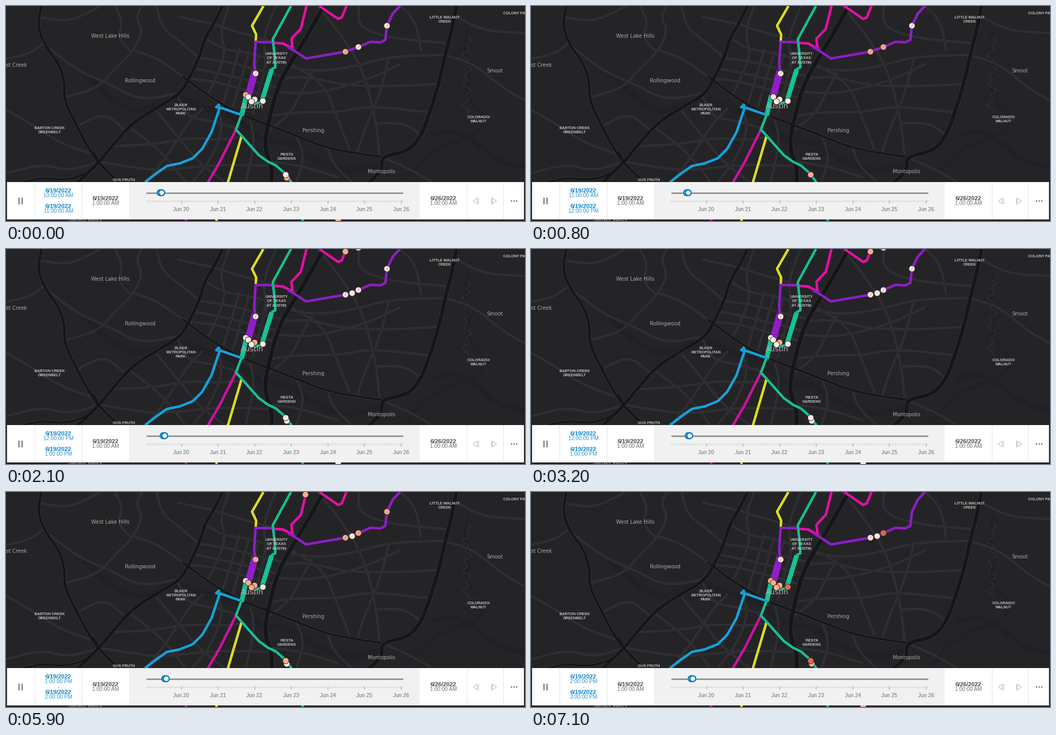
Write a matplotlib script that moves like this. It is 1000 px wide and 414 px high and loops after 7.2 s.

```python
import matplotlib.pyplot as plt
import numpy as np
from matplotlib.animation import FuncAnimation
from matplotlib.patches import Circle, Polygon, Rectangle

W, H = 1000, 414
DPI = 64  # a power of two keeps the pixel size exact
PX = 72 / DPI
FRAMES, INTERVAL = 72, 100

BACK = "#242427"
YELLOW, PURPLE, TEAL = "#eef01c", "#9b1fd6", "#17cf9f"
PINK, MAGENTA, BLUE = "#fb0fb4", "#e310b0", "#14b0ec"
ACCENT = "#007ac2"
DOT_COLORS = {"c": "#fbeae0", "p": "#f8ad8a", "r": "#e3694f"}

fig = plt.figure(figsize=(W / DPI, H / DPI), dpi=DPI, facecolor=BACK)
ax = fig.add_axes([0, 0, 1, 1])
ax.set(xlim=(0, W), ylim=(H, 0))
ax.axis("off")


def pairs(coords):
    return np.array(coords, float).reshape(-1, 2)


def smooth(pts, rounds=3):
    """Cut corners while keeping both ends."""
    for _ in range(rounds):
        a, b = pts[:-1], pts[1:]
        cut = np.stack([0.75 * a + 0.25 * b, 0.25 * a + 0.75 * b], 1)
        pts = np.vstack([pts[:1], cut.reshape(-1, 2), pts[-1:]])
    return pts


def stroke(pts, color, width, z, **kw):
    return ax.plot(*np.asarray(pts).T, color=color, lw=width * PX, zorder=z,
                   solid_capstyle="butt", solid_joinstyle="round", **kw)[0]


def street(*coords):
    pts = smooth(pairs(coords))
    stroke(pts, "#404044", 3.2, 2)
    stroke(pts, "#252528", 1.5, 2.1)


def highway(*coords, width=6):
    pts = smooth(pairs(coords))
    stroke(pts, "#35363a", width + 1.6, 3)
    stroke(pts, "#141618", width, 3.1)


def water(*coords, width=8):
    stroke(smooth(pairs(coords)), "#1f2124", width, 1)


def route(color, *coords, lanes=1):
    pts = pairs(coords)
    side = (np.arange(lanes) - (lanes - 1) / 2) * 4.2
    for dx in side:
        lane = pts + [dx, dx * 0.25]
        stroke(lane, color, 4.6, 5)
        stroke(lane, "#00000055", 1.5, 5.1, dashes=(1.1, 1.6))


def label(x, y, text, size, color, bold=False, font="Liberation Sans",
          ha="center", z=8):
    """Place text with its capitals centred on y."""
    return ax.text(x, y + 0.36 * size, text, fontsize=size * PX, color=color,
                   family=font, weight="bold" if bold else "normal",
                   ha=ha, va="baseline", zorder=z)


def place(x, y, text, size=9.7, color="#a9a9ab"):
    label(x, y, text, size, color, font="DejaVu Sans")


def district(x, y, *lines):
    for i, line in enumerate(lines):
        label(x, y + 8.3 * i, line, 7.2, "#c4c4c6", bold=True)


# Water
water(150, 130, 215, 190, 262, 205, 330, 172, 375, 195, 440, 212, 470, 240,
      500, 262, 540, 258, 600, 300, 660, 320, 720, 305, width=12)
water(890, 45, 884, 90, 894, 130, 886, 160, 898, 190, 930, 215, 905, 250,
      850, 265, 810, 290, 770, 335, width=5)
water(820, 250, 860, 238, 905, 262, 950, 300, 1000, 310, width=10)
jag = np.linspace(0, 1, 70)
creek = np.c_[888 + 5 * np.sin(47 * jag) + 4 * np.sin(19 * jag), 60 + 145 * jag]
stroke(creek, "#38393c", 1, 1.5)

# West
street(0, 102, 45, 92, 72, 72)
street(64, 22, 120, 30, 160, 12, 182, 0)
street(262, 0, 250, 22, 264, 48, 243, 90, 210, 120, 178, 158, 112, 176)
street(75, 75, 140, 126, 200, 150, 258, 182, 332, 168)
street(245, 85, 290, 100, 330, 128, 350, 142)
street(140, 230, 190, 205, 230, 240)
street(0, 322, 70, 304, 120, 318, 180, 300)
street(0, 200, 40, 222, 100, 262, 165, 285)
street(210, 0, 225, 30, 215, 62, 243, 90)
street(290, 0, 300, 42, 340, 72, 372, 100)

# Centre north of the river
street(400, 35, 436, 47, 476, 58, 560, 82)
street(383, 62, 420, 84, 470, 90, 540, 112)
street(372, 100, 430, 108, 480, 122, 545, 138)
street(352, 140, 400, 145, 440, 156, 520, 178)
street(362, 120, 420, 132, 475, 145, 525, 158)
street(430, 0, 412, 50, 424, 90, 404, 140, 388, 172)
street(330, 20, 365, 28, 400, 35)
for step in range(4):
    x = 418 + 19 * step
    street(x + 32, 82 + 5 * step, x + 18, 130 + 4 * step, x, 188 + 7 * step)
street(520, 0, 495, 60, 502, 110, 488, 160)

# East
street(600, 0, 640, 48, 680, 108, 700, 165, 714, 230, 720, 290)
street(548, 118, 600, 126, 665, 118, 740, 97, 846, 94)
street(545, 110, 612, 148, 638, 215, 662, 276)
street(530, 140, 580, 135, 650, 153, 740, 155, 834, 150)
street(520, 165, 590, 170, 690, 145, 760, 112)
street(508, 212, 560, 204, 640, 205, 700, 192, 818, 205)
street(505, 240, 548, 208, 568, 168, 590, 128)
street(738, 98, 722, 165, 690, 240, 676, 284)
street(680, 0, 678, 40, 740, 62, 855, 72)
street(760, 0, 790, 30, 800, 88)
street(846, 95, 900, 110, 960, 160, 1000, 182)
street(868, 20, 920, 48, 1000, 52)
street(800, 250, 770, 225, 712, 226)
street(725, 292, 770, 310, 820, 338)
street(560, 250, 575, 290, 560, 338)
street(620, 274, 630, 305, 665, 338)
street(512, 300, 570, 308, 640, 330)

# South
street(456, 252, 420, 258, 350, 254, 288, 266, 205, 270)
street(380, 196, 350, 225, 318, 278, 272, 338)
street(290, 202, 335, 256, 370, 300, 420, 338)
street(240, 235, 300, 280, 345, 338)
street(330, 172, 350, 215, 400, 222, 446, 236)
street(410, 200, 418, 240, 392, 300, 360, 338)
street(470, 220, 480, 260, 462, 338)
street(180, 300, 240, 310, 300, 318, 400, 305, 510, 308)

highway(68, 0, 61, 40, 76, 78, 100, 108, 113, 145, 112, 182, 137, 232,
        160, 276, 184, 308, 218, 340, width=5)
highway(417, 0, 400, 35, 383, 62, 372, 100, 351, 143, 335, 170, 290, 196,
        245, 224, 208, 265, 180, 300, 138, 340)
highway(0, 352, 60, 330, 115, 336, 158, 322, 180, 300, 168, 280, width=4)
highway(340, 135, 400, 180, 455, 210, 500, 227, 560, 250, 620, 274,
        690, 286, 722, 290, width=4)
highway(612, 0, 590, 40, 568, 78, 548, 110, 531, 140, 518, 175, 508, 215,
        500, 250, 500, 280, 512, 308, 512, 345, width=8)
highway(868, 0, 858, 50, 846, 95, 834, 150, 815, 210, 800, 250, 775, 280,
        722, 290, 726, 315, 694, 345, width=7)

# Transit routes
route(YELLOW, 496, 0, 474, 38, 482, 55, 481, 70)
route(YELLOW, 454, 250, 428, 338, 405, 414)
route(MAGENTA, 443, 238, 412, 300, 390, 338, 346, 414)
route(PINK, 515, 71, 534, 72, 552, 82, 550, 63, 568, 44, 579, 0)
route(PINK, 604, 0, 640, 25, 647, 22, 656, 0)
route(PURPLE, 481, 130, 478, 113, 481, 69, 515, 70)
route(PURPLE, 543, 79, 554, 85, 578, 101, 654, 88, 679, 79, 702, 69, 722, 70,
      731, 65, 734, 38, 745, 15, 759, 0)
route(TEAL, 549, 0, 514, 64, 517, 90, 519, 118, 511, 122)
route(TEAL, 512, 122, 493, 183, lanes=2)
route(TEAL, 495, 184, 483, 187, 476, 181)
route(PURPLE, 480, 125, 467, 172, lanes=3)
route(TEAL, 463, 172, 454, 211, lanes=2)
route(TEAL, 454, 209, 443, 238, 455, 251, 470, 268, 487, 287, 505, 300,
      520, 307, 535, 320, 549, 338, 572, 414)
route(BLUE, 452, 209, 411, 195, 405, 195, 410, 190, 411, 198, 396, 243,
      378, 275, 360, 293, 335, 303, 310, 308, 290, 322, 268, 339)

# Map labels
place(201, 58, "West Lake Hills")
place(20, 114, "st Creek")
place(258, 144, "Rollingwood")
place(942, 125, "Smoot")
place(592, 239.5, "Pershing")
place(724, 318.5, "Montopolis")
place(474, 192, "Austin", 14, "#b4b4b6")
place(153, 411, "Sunset Valley")
district(845, 21.5, "LITTLE WALNUT", "CREEK")
district(984, 13.5, "COLONY PARK")
district(521, 91.5, "UNIVERSITY", "OF TEXAS", "AT AUSTIN")
district(337, 190, "ZILKER", "METROPOLITAN", "PARK")
district(84, 234, "BARTON CREEK", "GREENBELT")
district(910.5, 213, "COLORADO/", "WALNUT")
district(541, 285, "FIESTA", "GARDENS")
district(227, 334, "GUS FRUTH")

# Bus positions: one letter per stop gives its colour for the hour
STOPS = [(577, 5), (654, 5), (679, -2), (734, 38), (654, 88), (667, 85),
         (679, 79), (481, 130), (462, 171), (467, 175), (479, 180),
         (473, 184), (495, 183), (541, 331), (539, 325), (640, 412)]
HOURS = [
    (0, 10, "---cp-ccpccccpcp"),
    (1, 11, "---cp-pc-cccc-p-"),
    (20, 12, "-ppcccccccpccccc"),
    (40, 13, "p--ppcppcpppccp-"),
    (60, 14, "----ccrcpppprprp"),
]
SLASHED = {3, 4, 6, 7}
dots = []
for i, (x, y) in enumerate(STOPS):
    dot = ax.add_patch(Circle((x, y), 5.9, ec="#2b2022", lw=0.9 * PX, zorder=9))
    parts = [dot]
    if i in SLASHED:
        parts.append(stroke([(x - 1.5, y + 3.5), (x + 2, y - 3.5)],
                            "#6b5a5a", 0.9, 9.1, alpha=0.6))
    dots.append(parts)

# Time slider panel
PANEL = 20


def box(x0, y0, x1, y1, color, z=PANEL):
    ax.add_patch(Rectangle((x0, y0), x1 - x0, y1 - y0, fc=color, ec="none", zorder=z))


def panel_text(x, y, text, size, color, bold=False):
    return label(x, y, text, size, color, bold, z=PANEL + 2)


box(2, 339, 998, 411, "#ffffff")
box(237, 339, 797, 411, "#f2f1f2")
for x in (55, 146, 888, 958):
    box(x, 339, x + 1, 411, "#e2e2e2")
for x in (24, 30):
    box(x, 369, x + 1.5, 382, "#6e6e6e")
for x in (974, 979, 984):
    ax.add_patch(Circle((x, 375.5), 1.3, fc="#5a5a5a", ec="none", zorder=PANEL + 1))
for x, d in ((905, 1), (940, -1)):
    ax.add_patch(Polygon([(x - 5 * d, 375.5), (x + 3 * d, 370), (x + 3 * d, 381)],
                         fc="none", ec="#c3c3c3", lw=1.2 * PX, zorder=PANEL + 1))
    stroke([(x + 5 * d, 369), (x + 5 * d, 382)], "#c3c3c3", 1.2, PANEL + 1)

TRACK, HOUR = 270, 494 / 168
stroke([(TRACK, 359.7), (764.5, 359.7)], "#959595", 3, PANEL + 1)
ticks = TRACK + HOUR * np.arange(169)
ax.vlines(ticks, 374, 377, colors="#b9b9b9", lw=0.8 * PX, zorder=PANEL + 1)
for day in range(7):
    x = TRACK + HOUR * (23 + 24 * day)
    stroke([(x, 374), (x, 380)], "#8c8c8c", 1, PANEL + 1)
    panel_text(x, 391.5, f"Jun {20 + day}", 10.2, "#6e6e6e")

for x, date in ((191.5, "6/19/2022"), (842.5, "6/26/2022")):
    panel_text(x, 370, date, 11.2, "#4c4c4c", True)
    panel_text(x, 379.7, "1:00:00 AM", 10.2, "#6e6e6e")

for y in (355, 384.5):
    panel_text(101, y, "6/19/2022", 11.2, "#1083cb", True)
panel_text(101, 375.5, "-", 10.2, "#1083cb")
start_text = panel_text(101, 364.7, "", 10.2, "#2a94d8")
end_text = panel_text(101, 394.2, "", 10.2, "#2a94d8")
thumbs = [ax.add_patch(Circle((0, 359.5), 5.6, fc="white", ec=ACCENT,
                              lw=2.4 * PX, zorder=PANEL + 3 + i))
          for i in range(2)]


def clock(hour):
    return f"{(hour - 1) % 12 + 1}:00:00 {'AM' if hour < 12 else 'PM'}"


def update(frame):
    _, hour, colors = [entry for entry in HOURS if entry[0] <= frame][-1]
    for parts, key in zip(dots, colors):
        for part in parts:
            part.set_visible(key != "-")
        parts[0].set_facecolor(DOT_COLORS.get(key, BACK))
    start_text.set_text(clock(hour))
    end_text.set_text(clock(hour + 1))
    for i, thumb in enumerate(thumbs):
        thumb.center = (TRACK + HOUR * (hour - 1 + i) + 0.6, 359.5)
    return []


anim = FuncAnimation(fig, update, frames=FRAMES, interval=INTERVAL,
                     repeat=True, repeat_delay=0)
plt.show()
```
